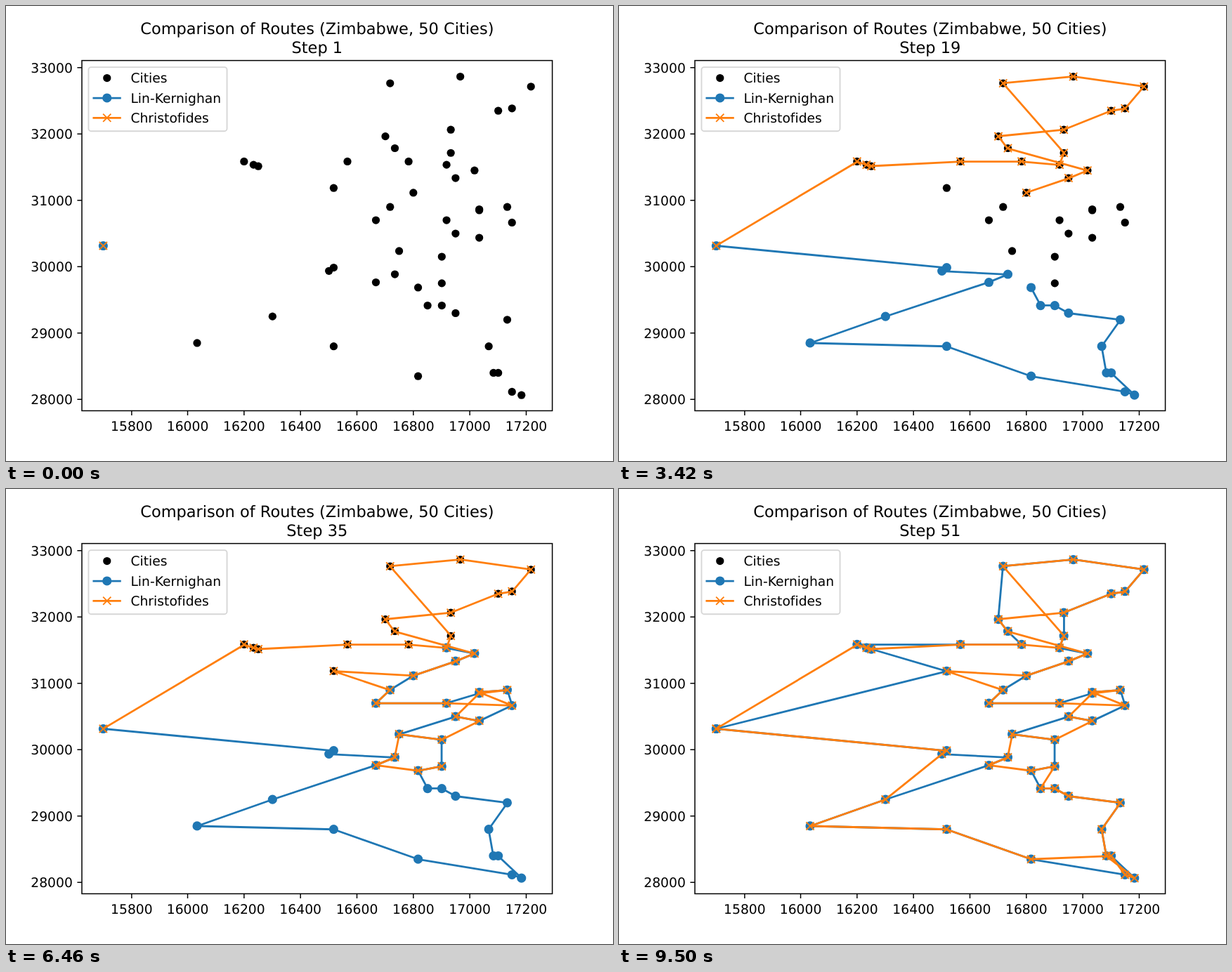
An HTML page that plays this animation: 864x648 px, repeating every 9.69 s.

```html
<!DOCTYPE html>
<html lang="en">
<head>
<meta charset="utf-8">
<title>Comparison of Routes</title>
<style>
  html, body { margin: 0; width: 100%; height: 100%; overflow: hidden; background: #fff; }
  svg { display: block; width: 864px; height: 648px; }
  text { font: 27.78px "DejaVu Sans", sans-serif; font-variant-ligatures: none; text-rendering: geometricPrecision; }
  .title { font-size: 33.33px; text-anchor: middle; }
  .axis { fill: none; stroke: #000; stroke-width: 2.22; }
  .route { fill: none; stroke-width: 4.17; stroke-linejoin: round; stroke-linecap: square; }
  .cross { fill: none; stroke: #ff7f0e; stroke-width: 2.78; }
</style>
</head>
<body>
<svg viewBox="0 0 1280 960">
  <g id="axes"></g>
  <g id="cities"></g>
  <g id="routes"></g>
  <g id="legend"></g>
  <text class="title" x="656" y="59.3">Comparison of Routes (Zimbabwe, 50 Cities)</text>
  <text class="title" id="step" x="656" y="99"></text>
</svg>
<script>
const STEP_MS = 190;
const BLUE = '#1f77b4', ORANGE = '#ff7f0e';
const PLOT = { left: 160, right: 1152, top: 115.2, bottom: 854.4 };
const PT = 200 / 72;

// Arc minutes east and north of the first and lowest city; the plot keeps a 5 % margin around 91 x 288.
const scale = (from, to, range) => m => from + (to - from) * (m / range + 0.05) / 1.1;
const px = scale(PLOT.left, PLOT.right, 91);
const py = scale(PLOT.bottom, PLOT.top, 288);
const minutes = value => value * 0.06;

// Cities in the order Christofides visits them.
const cities = [
  [0,135], [30,211], [32,208], [33,207], [52,211], [65,211], [73,208], [74,219], [61,282], [76,288],
  [91,279], [87,259], [84,257], [74,240], [60,234], [62,223], [79,203], [75,196], [66,183], [49,187],
  [61,170], [58,158], [73,158], [87,156], [80,168], [86,170], [80,167], [75,146], [80,142], [72,125],
  [63,130], [62,109], [58,102], [67,97], [72,101], [69,81], [72,81], [75,74], [86,68], [82,44],
  [83,20], [89,0], [87,3], [84,20], [67,17], [49,44], [20,47], [36,71], [48,112], [49,115]
].map(([east, north]) => [px(east), py(north)]);

// Lin-Kernighan walks the same tour mostly backwards, in runs of neighbouring stops.
const runs = '0 49-48 31-32 47-44 42-41 43 40-35 33-34 29-30 27-28 23 25-24 26 22-20 18-16 6-7 13-8 14-15 5-4 1-3 19';

function stopsOf(run) {
  const [from, to = from] = run.split('-').map(Number);
  const direction = Math.sign(to - from);
  return Array.from({ length: Math.abs(to - from) + 1 }, (_, k) => cities[from + k * direction]);
}

const closed = tour => [...tour, tour[0]];
const blueTour = closed(runs.split(' ').flatMap(stopsOf));
const orangeTour = closed(cities);
const STEPS = orangeTour.length;

const $ = id => document.getElementById(id);
const snap = Math.round;
const dot = (r, fill) => ([x, y]) => `<circle cx="${snap(x)}" cy="${snap(y)}" r="${r}" fill="${fill}"/>`;
const cityDot = dot(3 * PT, '#000');
const blueDot = dot(3.5 * PT, BLUE);
const cross = ([x, y]) => {
  const size = 6 * PT;
  return `<path class="cross" d="M${snap(x) - size / 2} ${snap(y) - size / 2}` +
    `l${size} ${size}m0 ${-size}l${-size} ${size}"/>`;
};
const line = (points, color) =>
  `<polyline class="route" stroke="${color}" points="${points.map(p => p.join()).join(' ')}"/>`;
const route = (points, color, marker) => line(points, color) + points.map(marker).join('');
const label = (x, y, text, anchor = 'start') =>
  `<text x="${x}" y="${y}" text-anchor="${anchor}">${text}</text>`;

function drawAxes() {
  const [left, right, top, bottom] = [PLOT.left, PLOT.right, PLOT.top, PLOT.bottom].map(snap);
  const tick = 3.5 * PT;
  let out = `<rect class="axis" x="${left}" y="${top}" width="${right - left}" height="${bottom - top}"/>`;
  for (let v = 15800; v <= 17200; v += 200) {
    const x = snap(px(minutes(v) - 942));
    out += `<path class="axis" d="M${x} ${bottom}v${tick}"/>` + label(x, 896, v, 'middle');
  }
  for (let v = 28000; v <= 33000; v += 1000) {
    const y = snap(py(minutes(v) - 1684));
    out += `<path class="axis" d="M${left} ${y}h${-tick}"/>` + label(left - 2 * tick, y + 10.6, v, 'end');
  }
  $('axes').innerHTML = out;
}

function drawLegend() {
  const row = (index, text, marker, color) => {
    const y = 152.3 + index * 41.9;
    return (color ? line([[185, y], [240.56, y]], color) : '') +
      marker([212.8, y]) + label(262.8, y + 9.6, text);
  };
  $('legend').innerHTML =
    '<rect x="174" y="129" width="292" height="135" rx="5.56" fill="#fff" fill-opacity=".8"' +
    ' stroke="#ccc" stroke-opacity=".8" stroke-width="2.78"/>' +
    row(0, 'Cities', cityDot) +
    row(1, 'Lin-Kernighan', blueDot, BLUE) +
    row(2, 'Christofides', cross, ORANGE);
}

let shown = 0;
function render(time) {
  const step = Math.floor(time / STEP_MS) % STEPS + 1;
  if (step === shown) return;
  shown = step;
  $('step').textContent = `Step ${step}`;
  $('routes').innerHTML =
    route(blueTour.slice(0, step), BLUE, blueDot) +
    route(orangeTour.slice(0, step), ORANGE, cross);
}

drawAxes();
drawLegend();
$('cities').innerHTML = cities.map(cityDot).join('');

const start = performance.now();
function tick() {
  render(performance.now() - start);
  requestAnimationFrame(tick);
}
tick();
</script>
</body>
</html>
```
